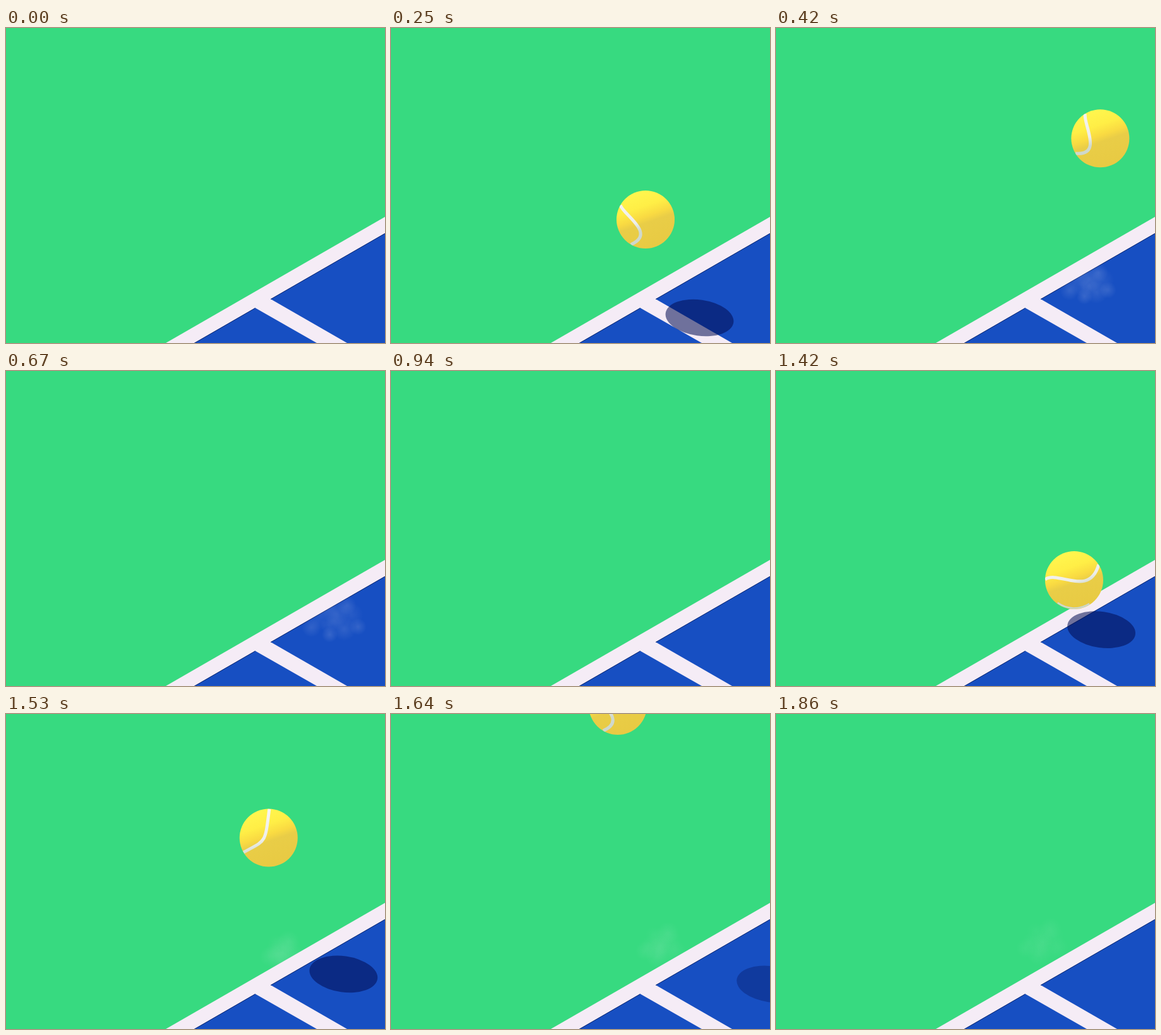
An HTML page with a canvas that plays this animation: 600x500 px, repeating every 1890 ms.

```html
<!DOCTYPE html>
<html lang="en">
<head>
<meta charset="utf-8">
<title>Tennis bounce</title>
<style>
  html, body { margin: 0; width: 100%; height: 100%; overflow: hidden; background: #37da80; }
  canvas { display: block; }
</style>
</head>
<body>
<canvas id="stage" width="600" height="500"></canvas>
<script>
const ctx = document.getElementById('stage').getContext('2d');
const LOOP = 1890, STEP = 250 / 9, R = 46, SLOPE = 0.577;

// Seam as a cubic curve around the ball centre, seen from two sides
const SMILE = [[41, -26], [24, 28], [-25, -16], [-45, -1]];
const SIDE = [[-40, -23], [-36, -8], [18, 22], [-24, 41]];

// hit: time and place of the bounce; vx and fall in px/ms
const balls = [
  { hit: 300, x: 435, y: 395.5, vx: 0.64, fall: 1.83, from: 80,
    turn: dt => (dt + 50) * 0.003, roll: () => 1 },
  { hit: 1436, x: 462.6, y: 369.8, vx: -0.486, fall: 1.96, from: 1245,
    turn: () => 0, roll: dt => clamp((dt + 19) / 222), rim: true }
];

const clouds = [
  { start: 310, end: 945, fade: 275, x: 524, y: 396, dx: -75, w: 46, h: 30, opacity: 0.11, seed: 5 },
  { start: 1446, end: 2300, fade: 600, x: 421, y: 362, dx: 34, w: 32, h: 26, opacity: 0.05, seed: 9 }
];

function clamp(v) { return Math.max(0, Math.min(1, v)); }

function random(seed) {
  return () => (seed = seed * 16807 % 2147483647) / 2147483647;
}

for (const c of clouds) {
  const rnd = random(c.seed * 7919);
  c.puffs = Array.from({ length: 11 }, (_, i) => {
    const angle = i * 2.4, far = Math.sqrt(i / 11);
    return { x: Math.cos(angle) * far * c.w, y: Math.sin(angle) * far * c.h,
             r: 12 + 9 * rnd(), a: c.opacity * (0.4 + rnd()) };
  });
}

function poly(points, color) {
  ctx.beginPath();
  points.forEach(p => ctx.lineTo(...p));
  ctx.closePath();
  ctx.fillStyle = color;
  ctx.fill();
}

// Blue field with a dark rim on the edge that rises to the right
function field(points, edge) {
  poly(points, '#174fc2');
  ctx.beginPath();
  edge.forEach(([x, y]) => ctx.lineTo(x, y + 0.4));
  ctx.strokeStyle = '#10296f';
  ctx.lineWidth = 1;
  ctx.stroke();
}

function drawCourt() {
  ctx.fillStyle = '#37da80';
  ctx.fillRect(0, 0, 600, 500);
  poly([[253, 500], [600, 500 - 347 * SLOPE], [600, 500]], '#f5ecf6');
  const corner = [419, 430.2], far = [600, 430.2 - 181 * SLOPE], tip = [394.5, 444.2];
  field([corner, far, [600, 500], [540, 500]], [corner, far]);
  field([[298, 500], tip, [492, 500]], [[298, 500], tip]);
}

function drawCloud(c, t) {
  const age = t - c.start;
  if (age < 0 || t >= c.end) return;
  const drift = Math.exp(-age / 110);
  const size = 1 - 0.5 * drift;
  const alpha = clamp(age / 60 + 0.3) * clamp((c.end - t) / c.fade);
  for (const p of c.puffs) {
    const x = c.x + c.dx * drift + p.x * size;
    const y = c.y + 34 * drift + p.y * size;
    const g = ctx.createRadialGradient(x, y, 0, x, y, p.r);
    g.addColorStop(0, `rgba(245,240,250,${p.a * alpha})`);
    g.addColorStop(1, 'rgba(245,240,250,0)');
    ctx.fillStyle = g;
    ctx.fillRect(x - p.r, y - p.r, 2 * p.r, 2 * p.r);
  }
}

function place(b, t) {
  const dt = t - b.hit, down = dt < 0;
  const x = b.x + b.vx * dt * (down ? 1 : 1.05);
  const y = b.y + dt * (down ? b.fall : -1.887);
  const gap = 30 + dt * (down ? -2.52 : 2.03);
  return { x, y, dt, sx: x + 0.548 * gap, sy: y + gap };
}

function drawShadow(p) {
  ctx.beginPath();
  ctx.ellipse(p.sx, p.sy, 54.3, 28.6, 0.14, 0, 7);
  ctx.fillStyle = `rgba(3,14,83,${0.55 * clamp((285 - p.dt) / 140)})`;
  ctx.fill();
}

// Blend of both views; the ends stay on the outline of the ball
function seam(f) {
  return SMILE.map((p, i) => {
    const [x, y] = p.map((v, n) => v + (SIDE[i][n] - v) * f);
    const s = i % 3 ? 1 : R / Math.hypot(x, y);
    return [x * s, y * s];
  });
}

function shade(...stops) {
  const g = ctx.createLinearGradient(-15, -43, 15, 43);
  stops.forEach(([at, color]) => g.addColorStop(at, color));
  return g;
}

function drawBall(b, p) {
  ctx.save();
  ctx.translate(p.x, p.y);
  ctx.beginPath();
  ctx.arc(0, 0, R, 0, 7);
  ctx.fillStyle = shade([0, '#fff64e'], [.27, '#ffee46'], [.45, '#f9da42'], [.56, '#e9cd47'], [1, '#e8ca43']);
  ctx.fill();
  ctx.clip();
  ctx.strokeStyle = shade([0, '#f7f5f2'], [.5, '#eeeeea'], [.65, '#d0d9cd'], [1, '#cbd6cc']);
  if (b.rim) {
    ctx.globalAlpha = clamp(1 - p.dt / 80);
    ctx.lineWidth = 2.5;
    ctx.beginPath();
    ctx.arc(0, 0, 44.5, 1, 2.2);
    ctx.stroke();
    ctx.globalAlpha = 1;
  }
  ctx.rotate(b.turn(p.dt));
  const [start, c1, c2, end] = seam(b.roll(p.dt));
  ctx.lineWidth = 5;
  ctx.beginPath();
  ctx.moveTo(...start);
  ctx.bezierCurveTo(...c1, ...c2, ...end);
  ctx.stroke();
  ctx.restore();
}

function draw(time) {
  // Motion advances at 36 steps per second, on 10 ms ticks
  let n = 0;
  while (n < 67 && Math.round((n + 1) * STEP / 10) * 10 <= time) n++;
  const t = n * STEP;
  drawCourt();
  const live = balls.filter(b => t >= b.from && t < b.hit + 285).map(b => [b, place(b, t)]);
  live.forEach(([, p]) => drawShadow(p));
  clouds.forEach(c => drawCloud(c, t));
  live.forEach(([b, p]) => drawBall(b, p));
}

const begin = performance.now();
function tick() {
  draw((performance.now() - begin) % LOOP);
  requestAnimationFrame(tick);
}
tick();
</script>
</body>
</html>
```
